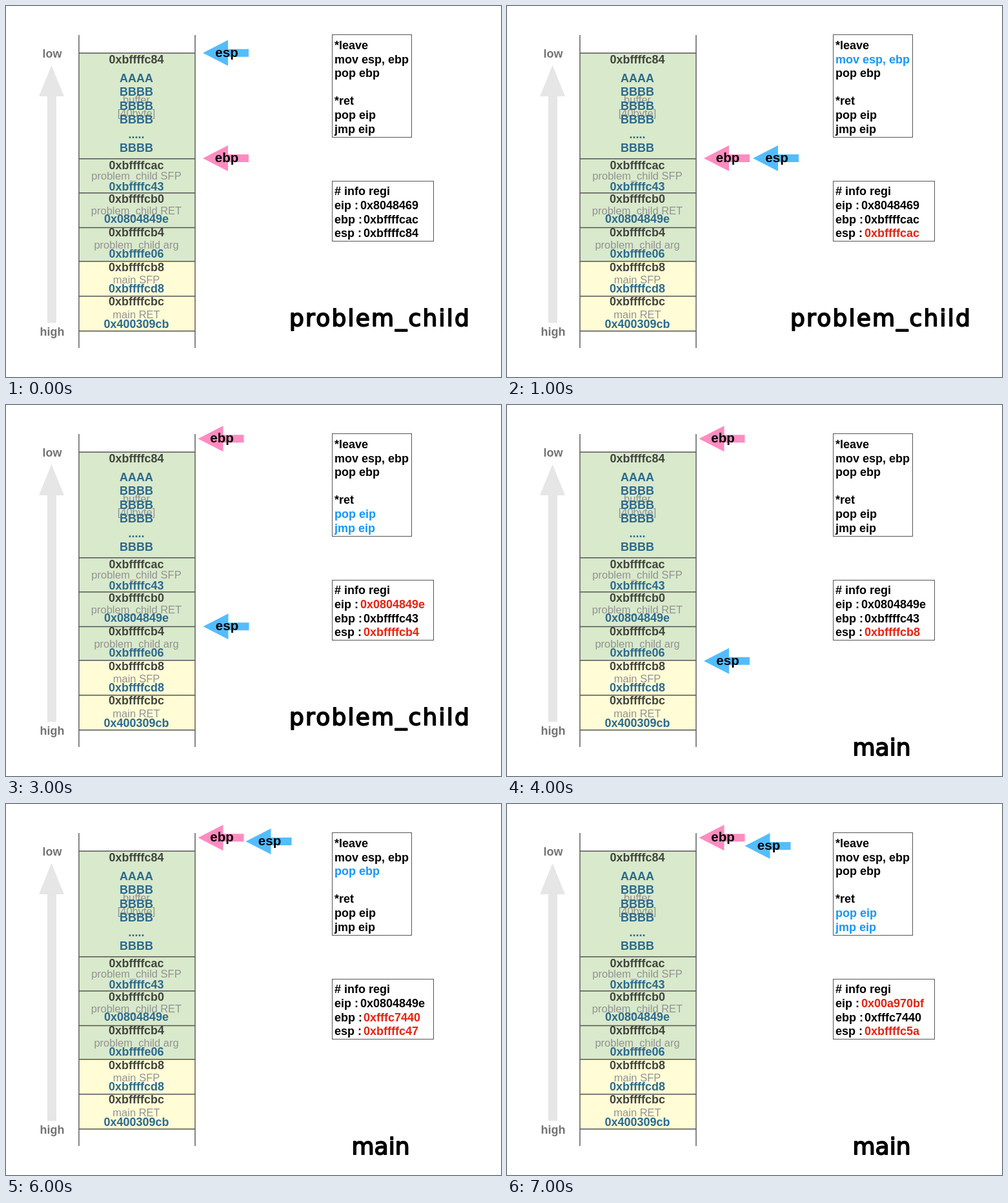
An HTML page for the animation above (8 s loop, 767 by 575 pixels).

```html
<!DOCTYPE html>
<html lang="en">
<head>
<meta charset="utf-8">
<title>Stack frames on leave and ret</title>
<style>
  html, body { margin: 0; width: 100%; height: 100%; overflow: hidden; background: #fff; }
  svg { display: block; width: 100%; height: 100%; }
  text { font: bold 18px "Liberation Sans", Arial, sans-serif; }
  .mid { text-anchor: middle; }
  .label { font-weight: normal; font-size: 16.5px; fill: #929292; }
  .addr { fill: #40443d; }
  .value { fill: #2b6a8f; }
  .axis { fill: #737373; }
  .pointer { font-size: 20.5px; }
  .line { fill: none; stroke: #555; stroke-width: 1.4; }
  .box { fill: #fff; stroke: #555; }
  .title { font: 36px "DejaVu Sans", sans-serif; stroke: #000; stroke-width: 1.8; stroke-linejoin: round; }
</style>
</head>
<body>
<svg id="stage" viewBox="0 0 767 575"></svg>
<script>
const stage = document.getElementById("stage");
const STEP = 1000;
const LEFT = 113, RIGHT = 293, CENTER = 202;

function add(parent, tag, attrs, text) {
  const el = document.createElementNS("http://www.w3.org/2000/svg", tag);
  for (const key in attrs) el.setAttribute(key, attrs[key]);
  if (text !== undefined) el.textContent = text;
  parent.appendChild(el);
  return el;
}
const label = (x, y, cls, text) => add(stage, "text", { x, y, class: cls }, text);

// Axis
add(stage, "path", { d: "M70.5 92L90 140H78V491H64V140H51Z", fill: "#e6e6e6" });
label(71.5, 80, "mid axis", "low");
label(71.5, 511, "mid axis", "high");

// Stack
add(stage, "rect", { x: LEFT, y: 73, width: 180, height: 323, fill: "#d9e9cb" });
add(stage, "rect", { x: LEFT, y: 396, width: 180, height: 108, fill: "#fffcd6" });
const rules = [73, 236.7, 289.7, 343.5, 395.8, 449.7, 503.7];
add(stage, "path", {
  class: "line",
  d: `M${LEFT} 45V530M${RIGHT} 45V530` + rules.map(y => `M${LEFT} ${y}H${RIGHT}`).join("")
});

label(CENTER, 151, "mid label", "buffer");
label(CENTER, 172, "mid label", "[40byte]");
label(CENTER, 89, "mid addr", "0xbffffc84");
[["AAAA", 118], ["BBBB", 139], ["BBBB", 161], ["BBBB", 182], [".....", 205], ["BBBB", 226]]
  .forEach(([text, y]) => label(CENTER, y, "mid value", text));

// Cell: address, name and value with their baselines
[
  ["0xbffffcac", 253, "problem_child SFP", 269, "0xbffffc43", 286],
  ["0xbffffcb0", 305, "problem_child RET", 323, "0x0804849e", 336],
  ["0xbffffcb4", 357, "problem_child arg", 376, "0xbffffe06", 390],
  ["0xbffffcb8", 411, "main SFP", 430, "0xbffffcd8", 444],
  ["0xbffffcbc", 464, "main RET", 484, "0x400309cb", 499]
].forEach(([addr, ay, name, ny, value, vy]) => {
  label(CENTER, ny, "mid label", name);
  label(CENTER, ay, "mid addr", addr);
  label(CENTER, vy, "mid value", value);
});

// Code and registers
add(stage, "rect", { class: "box", x: 505.5, y: 44.5, width: 123, height: 159 });
const code = ["*leave", "mov esp, ebp", "pop ebp", "", "*ret", "pop eip", "jmp eip"]
  .map((text, i) => label(509, 67 + 21.6 * i, "", text));

add(stage, "rect", { class: "box", x: 505.5, y: 271.5, width: 157, height: 93 });
label(509, 293, "", "# info regi");
const regs = [["eip", 314.5, 549], ["ebp", 336.5, 554], ["esp", 358, 554]].map(([name, y, x]) => {
  label(509, y, "", name + " :");
  return label(x, y, "", "");
});

function makePointer(name, color) {
  const g = add(stage, "g", {});
  add(g, "path", { d: "M0 0L39 -20V-6H71V6H39V20Z", fill: color });
  add(g, "text", { x: 37, y: 6, class: "mid pointer" }, name);
  return g;
}
const ebp = makePointer("ebp", "#ff8cc0");
const esp = makePointer("esp", "#53bdff");

const titles = [
  add(stage, "text", { x: 439, y: 496, class: "title", "letter-spacing": 2.2 }, "problem_child"),
  add(stage, "text", { x: 535.5, y: 543, class: "title" }, "main")
];

// lit: highlighted code lines; red: changed registers (eip, ebp, esp)
const home = [305, 236], away = [297.5, 52.3];
const steps = [
  { lit: [], regs: ["0x8048469", "0xbffffcac", "0xbffffc84"], red: [], ebp: home, esp: [305, 72.7] },
  { lit: [1], regs: ["0x8048469", "0xbffffcac", "0xbffffcac"], red: [2], ebp: home, esp: [381, 236] },
  { lit: [2], regs: ["0x8048469", "0xbffffc43", "0xbffffcb0"], red: [1, 2], ebp: away, esp: [305.5, 289.5] },
  { lit: [5, 6], regs: ["0x0804849e", "0xbffffc43", "0xbffffcb4"], red: [0, 2], ebp: away, esp: [305.5, 343.3] },
  { lit: [], regs: ["0x0804849e", "0xbffffc43", "0xbffffcb8"], red: [2], ebp: away, esp: [305, 396.7] },
  { lit: [1], regs: ["0x0804849e", "0xbffffc43", "0xbffffc43"], red: [2], ebp: away, esp: [374, 52.3] },
  { lit: [2], regs: ["0x0804849e", "0xfffc7440", "0xbffffc47"], red: [1, 2], ebp: away, esp: [371.5, 58] },
  { lit: [5, 6], regs: ["0x00a970bf", "0xfffc7440", "0xbffffc5a"], red: [0, 2], ebp: away, esp: [368.5, 65] }
];

let shown = -1;
function draw(ms) {
  const index = Math.floor(ms / STEP) % steps.length;
  if (index === shown) return;
  shown = index;
  const step = steps[index];
  code.forEach((el, i) => el.setAttribute("fill", step.lit.includes(i) ? "#1597fc" : "#000"));
  regs.forEach((el, i) => {
    el.textContent = step.regs[i];
    el.setAttribute("fill", step.red.includes(i) ? "#e8220e" : "#000");
  });
  ebp.setAttribute("transform", `translate(${step.ebp})`);
  esp.setAttribute("transform", `translate(${step.esp})`);
  titles.forEach((el, i) => el.setAttribute("visibility", (index >= 4) === (i === 1) ? "visible" : "hidden"));
}

const start = performance.now();
function tick() {
  draw(performance.now() - start);
  requestAnimationFrame(tick);
}
tick();
</script>
</body>
</html>
```
